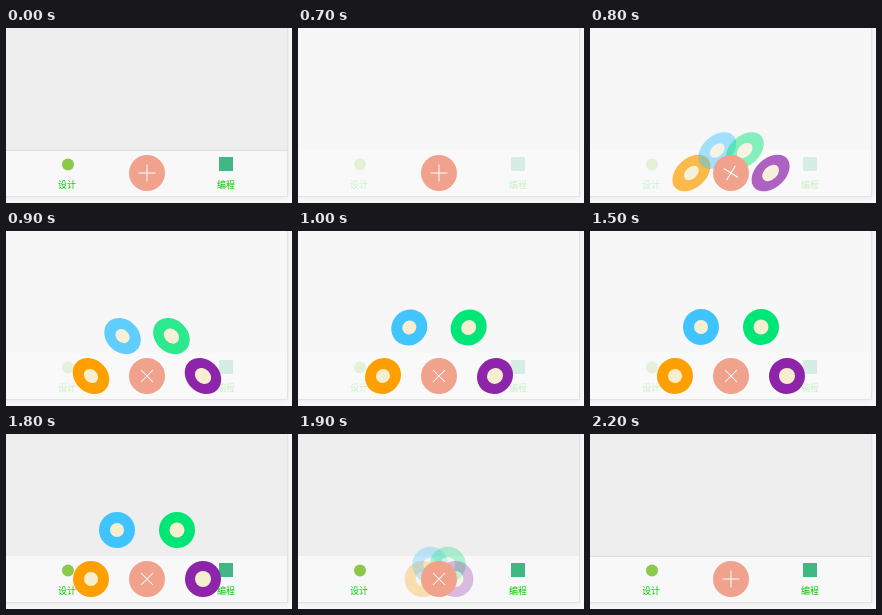
An HTML page that plays this animation: 286 px wide and 175 px high, repeating every 2.7 s.

```html
<!DOCTYPE html>
<html lang="zh">
<head>
<meta charset="utf-8">
<style>
html, body { margin: 0; width: 100%; height: 100%; overflow: hidden; background: #f8f8f8; }
#panel { position: absolute; left: -20px; top: -20px; width: 301px; height: 188px; background: #eee; box-shadow: 0 0 1px 1px #e3e3e3, 0 1px 6px #0001; }
svg { position: absolute; left: 0; top: 0; display: block; }
text { font: 9px "Noto Sans CJK SC", "Noto Sans CJK", sans-serif; fill: #00c800; text-anchor: middle; }
</style>
</head>
<body>
<div id="panel"></div>
<svg width="286" height="175" viewBox="0 0 286 175">
  <rect y="122" width="281" height="46" fill="#f8f8f8"/>
  <rect id="rule" y="122" width="281" height="1" fill="#dedede"/>
  <circle cx="62" cy="136.5" r="6" fill="#8cc84b"/>
  <rect x="213" y="129" width="14" height="14" fill="#41b883"/>
  <text x="61" y="159.8">设计</text>
  <text x="220" y="159.8">编程</text>
  <rect id="veil" width="281" height="168" fill="#fafafa" opacity=".8"/>
  <g id="items"></g>
  <g transform="translate(141 145)">
    <circle r="18" fill="#f1a28d"/>
    <path id="cross" d="M-8.5 0H8.5M0-8.5V8.5" stroke="#fff"/>
  </g>
</svg>
<script>
const LOOP = 2700, STEP = 100, OPEN = 700, CLOSE = 1800;
const $ = id => document.getElementById(id);
const clamp = u => Math.max(0, Math.min(1, u));
const easeOut = u => Math.sin(clamp(u) * Math.PI / 2);

// offset from the button, travel time, disc colour, badge radius
const items = [
  { x: -56, y: 0, time: 200, color: '#ffa000', r: 7 },
  { x: -30, y: -49, time: 330, color: '#40c4ff', r: 7 },
  { x: 30, y: -49, time: 330, color: '#00e676', r: 7.5 },
  { x: 56, y: 0, time: 200, color: '#8e24aa', r: 8 }
];
$('items').innerHTML = items.map(i =>
  `<g><circle r="18" fill="${i.color}"/><circle r="${i.r}" fill="#f5efcf"/></g>`).join('');
const nodes = $('items').children;

// damped wobble: the skew halves and flips at every ninth of a second
function wobble(t) {
  const key = n => n < 2 ? 0 : n > 8 ? 0 : -12.5 * (-0.5) ** (n - 2);
  const k = Math.max(0, (t - 570) / 111), n = Math.floor(k);
  return key(n) + (key(n + 1) - key(n)) * (k - n);
}

function draw(now) {
  const t = Math.floor(now % LOOP / STEP) * STEP;
  $('veil').style.display = t >= OPEN && t < CLOSE ? '' : 'none';
  $('rule').style.display = t >= OPEN && t < 2000 ? 'none' : '';

  const turn = t < 1900 ? easeOut((t - OPEN) / 200) : 1 - clamp((t - 1900) / 300);
  $('cross').setAttribute('transform', `rotate(${45 * turn})`);

  const skew = wobble(t);
  const left = 1 - easeOut((t - CLOSE) / 200);
  items.forEach((item, i) => {
    const p = t < CLOSE ? easeOut((t - OPEN) / item.time) : left;
    nodes[i].setAttribute('opacity', p);
    nodes[i].setAttribute('transform',
      `translate(${141 + item.x * p} ${145 + item.y * p}) skewX(${skew}) skewY(${skew})`);
  });
}

const start = performance.now();
function frame() {
  draw(performance.now() - start);
  requestAnimationFrame(frame);
}
frame();
</script>
</body>
</html>
```
